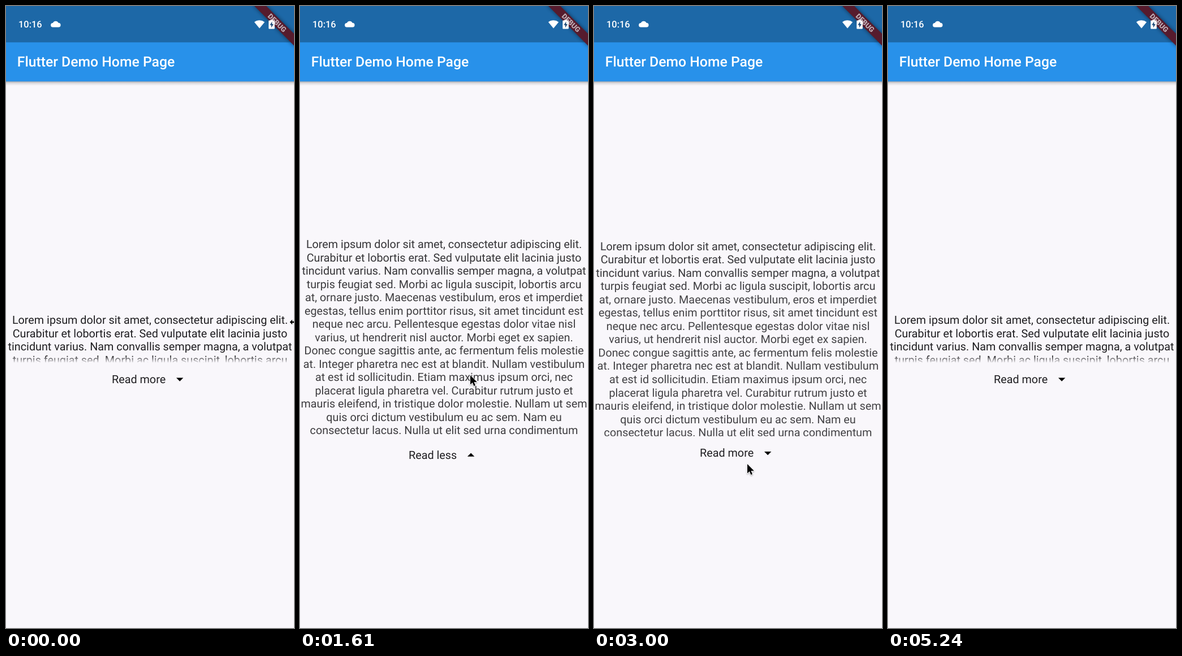
Recreate the animation shown at these times as an HTML page. Size 509 px wide and 1100 px high, loop 5270 ms.

```html
<!DOCTYPE html>
<html lang="en">
<head>
<meta charset="utf-8">
<title>Expandable text</title>
<style>
  html, body { margin: 0; width: 100%; height: 100%; overflow: hidden; background: #f9f7fb; }
  svg { display: block; width: 509px; height: 1100px; }
  text { font-family: Roboto, sans-serif; text-rendering: geometricPrecision; }
  .body { font-size: 19.8px; fill: #1f1e21; }
</style>
</head>
<body>
<svg viewBox="0 0 509 1100">
  <defs>
    <linearGradient id="fade" x1="0" y1="0" x2="0" y2="1">
      <stop offset=".86" stop-color="#fff"/>
      <stop offset="1" stop-color="#fff" stop-opacity=".1"/>
    </linearGradient>
    <linearGradient id="shade" x1="0" y1="0" x2="0" y2="1">
      <stop offset="0" stop-color="#000" stop-opacity=".34"/>
      <stop offset=".4" stop-color="#000" stop-opacity=".12"/>
      <stop offset="1" stop-color="#000" stop-opacity="0"/>
    </linearGradient>
    <filter id="soft" x="-50%" y="-100%" width="200%" height="300%">
      <feGaussianBlur stdDeviation="3.2"/>
    </filter>
    <filter id="drop" x="-50%" y="-50%" width="200%" height="200%">
      <feDropShadow dx="0" dy="1.2" stdDeviation="1" flood-opacity=".4"/>
    </filter>
    <mask id="mask" maskUnits="userSpaceOnUse" x="0" y="0" width="509" height="87">
      <rect width="509" height="86.6" fill="url(#fade)"/>
    </mask>
    <clipPath id="clip"><rect id="window" width="509" height="87"/></clipPath>
  </defs>

  <rect width="509" height="1100" fill="#f9f7fb"/>

  <g id="panel">
    <g clip-path="url(#clip)">
      <g id="full" class="body" text-anchor="middle"></g>
      <g id="short" mask="url(#mask)" class="body" text-anchor="middle"></g>
    </g>
  </g>
  <g id="button">
    <text id="label" class="body" y="6.8"></text>
    <path id="arrow"/>
  </g>

  <rect y="133" width="509" height="8" fill="url(#shade)"/>
  <rect y="64" width="509" height="69.4" fill="#2891ea"/>
  <rect width="509" height="64.3" fill="#1d68a7"/>
  <text x="19.8" y="107.4" font-size="24.74" font-weight="500" fill="#fff">Flutter Demo Home Page</text>

  <g transform="translate(509) rotate(45) scale(1.2372)">
    <rect x="-42" y="28" width="84" height="12" opacity=".5" filter="url(#soft)"/>
    <rect x="-42" y="28" width="84" height="12" fill="#561b2d"/>
    <text y="37.6" text-anchor="middle" font-size="10.2" font-weight="900" fill="#bfacb3">DEBUG</text>
  </g>

  <g fill="#fff">
    <text x="22" y="38" font-size="16.4" font-weight="500">10:16</text>
    <path d="M82.7 37.5a3.7 3.7 0 0 1 .2-7.4a5.2 5.2 0 0 1 9.6-.4a3.9 3.9 0 0 1 .3 7.8z"/>
    <path d="M448 39.4L438.9 28.4A14.6 14.6 0 0 1 457.1 28.4z"/>
    <path d="M467.4 25.6v-1.6h4.2v1.6h2.2q1 0 1 1v12.8q0 1-1 1h-8.6q-1 0-1-1V26.6q0-1 1-1z"/>
    <path d="M470.3 27.6l-4 6.2h2.5v4.6l4-6.4h-2.5z" fill="#1d4a78"/>
  </g>

  <path id="resize" stroke="#fff" stroke-width="2" stroke-linejoin="round" paint-order="stroke"
        d="M501.5 559l4.5-4.5v3.2h4v2.6h-4v3.2z"/>
  <path id="pointer" filter="url(#drop)" stroke="#fff" stroke-width="1.6" stroke-linejoin="round" paint-order="stroke"
        d="M0 0V16.6L3.8 13L6.4 19L9 17.9L6.5 12H11.8z"/>
</svg>

<script>
const LOOP = 5270;
const MID = 616.8, BUTTON = 59.4, LINE = 23.507;
const SHORT = 86.6, FULL = 17 * LINE;
const OPEN = 1444, CLOSE = 2968.5, DURATION = 195;

const LINES = [
  "Lorem ipsum dolor sit amet, consectetur adipiscing elit.",
  "Curabitur et lobortis erat. Sed vulputate elit lacinia justo",
  "tincidunt varius. Nam convallis semper magna, a volutpat",
  "turpis feugiat sed. Morbi ac ligula suscipit, lobortis arcu",
  "at, ornare justo. Maecenas vestibulum, eros et imperdiet",
  "egestas, tellus enim porttitor risus, sit amet tincidunt est",
  "neque nec arcu. Pellentesque egestas dolor vitae nisl",
  "varius, ut hendrerit nisl auctor. Morbi eget ex sapien.",
  "Donec congue sagittis ante, ac fermentum felis molestie",
  "at. Integer pharetra nec est at blandit. Nullam vestibulum",
  "at est id sollicitudin. Etiam maximus ipsum orci, nec",
  "placerat ligula pharetra vel. Curabitur rutrum justo et",
  "mauris eleifend, in tristique dolor molestie. Nullam ut sem",
  "quis orci dictum vestibulum eu ac sem. Nam eu",
  "consectetur lacus. Nulla ut elit sed urna condimentum",
  "efficitur."
];

// Pointer path: time, x, y
const PATH = [
  [30, 505, 558], [150, 430, 582], [330, 430, 582], [820, 301, 653],
  [1650, 301, 653], [2030, 293, 738], [2450, 275, 801], [2700, 271, 810],
  [3200, 271, 810], [3550, 520, 847]
];

const $ = id => document.getElementById(id);
const set = (id, attrs) => {
  for (const key in attrs) $(id).setAttribute(key, attrs[key]);
};
const clamp = v => Math.min(1, Math.max(0, v));
const smooth = v => v * v * (3 - 2 * v);

function fill(id, lines) {
  $(id).innerHTML = lines.map((line, i) =>
    `<text x="254.5" y="${(18.56 + i * LINE).toFixed(2)}">${line}</text>`).join("");
}

function pointerAt(t) {
  const i = PATH.findIndex(p => p[0] > t);
  const [t0, x0, y0] = PATH[i - 1], [t1, x1, y1] = PATH[i];
  const k = smooth((t - t0) / (t1 - t0));
  return [x0 + (x1 - x0) * k, y0 + (y1 - y0) * k];
}

function drawButton(isOpen, y) {
  const iconX = isOpen ? 302.1 : 307.15;
  $("label").textContent = isOpen ? "Read less" : "Read more";
  set("label", { x: isOpen ? 192.05 : 187 });
  set("arrow", {
    d: isOpen ? `M${iconX - 6.2} 2.5l6.2 -6.2l6.2 6.2z` : `M${iconX - 6.2} -2.5l6.2 6.2l6.2 -6.2z`
  });
  set("button", { transform: `translate(0 ${y})` });
}

function draw(t) {
  const p = clamp((t - OPEN) / DURATION) - clamp((t - CLOSE) / DURATION);
  const height = SHORT + (FULL - SHORT) * p;
  const top = MID - (height + BUTTON) / 2;

  set("panel", { transform: `translate(0 ${top})` });
  set("window", { height });
  set("full", { opacity: p });
  set("short", { opacity: 1 - p });
  drawButton(t >= OPEN && t < CLOSE, MID + height / 2);

  const moving = t >= PATH[0][0] && t < PATH[PATH.length - 1][0];
  set("resize", { visibility: t < PATH[0][0] ? "visible" : "hidden" });
  set("pointer", { visibility: moving ? "visible" : "hidden" });
  if (moving) set("pointer", { transform: `translate(${pointerAt(t)})` });
}

fill("full", LINES);
fill("short", LINES.slice(0, 4));
const start = performance.now();
function tick() {
  draw((performance.now() - start) % LOOP);
  requestAnimationFrame(tick);
}
tick();
</script>
</body>
</html>
```
